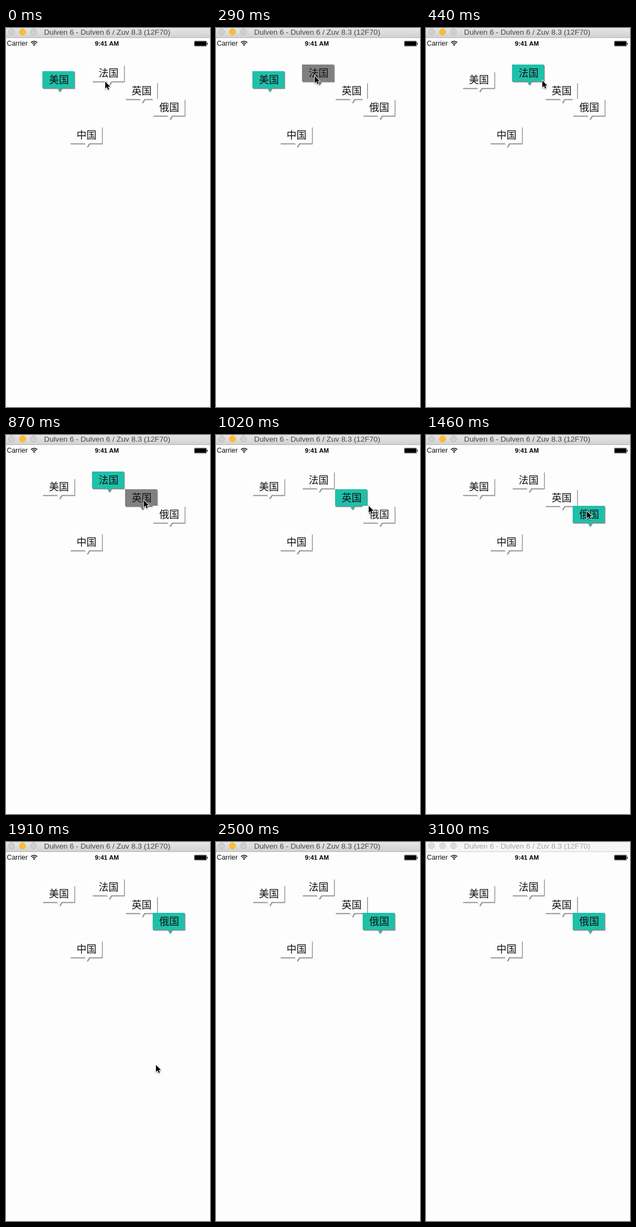
An HTML page with a canvas that plays this animation: 370 by 685 pixels, repeating every 3.16 s.

```html
<!DOCTYPE html>
<html lang="zh-CN">
<head>
<meta charset="utf-8">
<title>Country tags</title>
<style>
  html, body { margin: 0; width: 100%; height: 100%; overflow: hidden; background: #fdfdfd; }
  canvas { display: block; width: 370px; height: 685px; }
</style>
</head>
<body>
<canvas id="stage"></canvas>
<script>
const W = 370, H = 685, LOOP = 3160;
const STEP = 147, LEAD = 12;   // the screen refreshes in even steps
const EXIT = 17;               // step at which the pointer has left
const BLUR_AT = 3100;          // the window loses focus
const LATIN = '"Liberation Sans", Arial, sans-serif';
const CJK = '"Noto Sans CJK SC", "Noto Sans CJK", sans-serif';
const TITLE = 'Dulven 6 - Dulven 6 / Zuv 8.3 (12F70)';

const canvas = document.getElementById('stage');
const ctx = canvas.getContext('2d');
const ratio = window.devicePixelRatio || 1;
canvas.width = W * ratio;
canvas.height = H * ratio;
ctx.scale(ratio, ratio);

// A tag is selected at step `pick` and held down for the step before it.
const tags = [
  { name: '美国', x: 66, y: 78, pick: 0 },
  { name: '法国', x: 156, y: 66, pick: 3 },
  { name: '英国', x: 216, y: 98, pick: 7 },
  { name: '俄国', x: 266, y: 128, pick: 10 },
  { name: '中国', x: 116, y: 178, pick: Infinity }
];

const easeIn = u => u ** 2.4;
const easeOut = u => 1 - (1 - u) ** 1.5;
const smooth = u => u * u * (3 - 2 * u);

// Pointer glides: it rests between one glide's end and the next one's start.
const glides = [
  { from: 0, to: 1, x: 178, y: 86, rise: smooth },
  { from: 2, to: 5, x: 249, y: 117, rise: smooth },
  { from: 6, to: 8, x: 291, y: 137, rise: smooth },
  { from: 11, to: 13, x: 271, y: 402, rise: easeIn },
  { from: 13, to: 14, x: 316, y: 602, rise: smooth },
  { from: 14, to: 16, x: 339, y: 684, rise: easeIn }
];

function pointerAt(step) {
  let x = 179, y = 96;
  for (const g of glides) {
    const u = Math.min(1, Math.max(0, (step - g.from) / (g.to - g.from)));
    x += (g.x - x) * easeOut(u);
    y += (g.y - y) * g.rise(u);
  }
  return [Math.round(x), Math.round(y)];
}

const bubble = new Path2D('M0 0H58V30.5H35L31 37L27 30.5H0Z');
const arrow = new Path2D('M1 1V13.6L4 10.8L6 15.4L8 14.5L6.1 10.1H10Z');

function text(str, x, y, font, color, align = 'left') {
  ctx.font = font;
  ctx.fillStyle = color;
  ctx.textAlign = align;
  ctx.fillText(str, x, y);
}

function box(x, y, w, h, r) {
  ctx.beginPath();
  ctx.roundRect(x, y, w, h, r);
}

function shadow(color, blur, dx, dy) {
  ctx.shadowColor = color;
  ctx.shadowBlur = blur * ratio;
  ctx.shadowOffsetX = dx * ratio;
  ctx.shadowOffsetY = dy * ratio;
}

function drawTitleBar(active) {
  const grad = ctx.createLinearGradient(0, 0, 0, 17);
  grad.addColorStop(0, active ? '#e6e6e6' : '#f6f6f6');
  grad.addColorStop(1, active ? '#d1d1d1' : '#f5f5f5');
  ctx.fillStyle = grad;
  ctx.fillRect(0, 0, W, 17);
  ctx.fillStyle = active ? '#b4b4b4' : '#d2d2d2';
  ctx.fillRect(0, 17, W, 1);

  ctx.lineWidth = 1;
  for (const x of [10, 30, 50]) {
    const lit = active && x === 30;
    ctx.beginPath();
    ctx.arc(x, 7, 5.5, 0, Math.PI * 2);
    ctx.fillStyle = lit ? '#ffbd2e' : active ? '#d0d0d0' : '#dcdcdc';
    ctx.strokeStyle = lit ? '#f2b02c' : active ? '#bcbcbc' : '#cfcfcf';
    ctx.fill();
    ctx.stroke();
  }
  text(TITLE, 69, 12, '13.7px ' + LATIN, active ? '#474747' : '#a6a6a6');
}

function drawStatusBar() {
  text('Carrier', 1.5, 32.3, '12.4px ' + LATIN, '#111');
  text('9:41 AM', 183, 32, 'bold 11.4px ' + LATIN, '#000', 'center');

  const a = -Math.PI * 0.75, b = -Math.PI * 0.25;
  ctx.strokeStyle = ctx.fillStyle = '#000';
  ctx.lineWidth = 1.6;
  for (const r of [5, 8]) {
    ctx.beginPath();
    ctx.arc(51, 32, r, a, b);
    ctx.stroke();
  }
  ctx.beginPath();
  ctx.moveTo(51, 32.3);
  ctx.arc(51, 32.3, 2.8, a, b);
  ctx.fill();

  ctx.lineWidth = 0.5;
  box(341.5, 23.5, 22.5, 9.5, 1.5);
  ctx.stroke();
  box(342.2, 24.2, 21.1, 8.1, 0.8);
  ctx.fill();
  box(364.7, 26.7, 1.3, 3.2, 0.6);
  ctx.fill();
}

function drawTag({ name, x, y }, color) {
  ctx.save();
  ctx.translate(x, y);
  ctx.save();
  shadow('#868686', 1, 1.3, 1.8);
  ctx.fillStyle = color;
  ctx.fill(bubble);
  ctx.restore();
  text(name, 30, 22, '300 18px ' + CJK, '#111', 'center');
  ctx.restore();
}

function drawPointer(x, y) {
  ctx.save();
  ctx.translate(x, y);
  ctx.lineWidth = 1.8;
  ctx.strokeStyle = '#fff';
  shadow('rgba(0,0,0,.4)', 2, 0, 1);
  ctx.stroke(arrow);
  shadow('transparent', 0, 0, 0);
  ctx.fillStyle = '#000';
  ctx.fill(arrow);
  ctx.restore();
}

function draw(t) {
  const step = Math.floor((t + LEAD) / STEP);
  ctx.fillStyle = '#fdfdfd';
  ctx.fillRect(0, 0, W, H);
  drawTitleBar(t < BLUR_AT);
  drawStatusBar();

  const selected = tags.findLast(tag => step >= tag.pick);
  for (const tag of tags) {
    const held = step === tag.pick - 1;
    drawTag(tag, tag === selected ? '#1fc0aa' : held ? '#808080' : '#fefefe');
  }
  if (step < EXIT) drawPointer(...pointerAt(step));
}

const start = performance.now();
function tick() {
  draw((performance.now() - start) % LOOP);
  requestAnimationFrame(tick);
}
tick();
</script>
</body>
</html>
```
